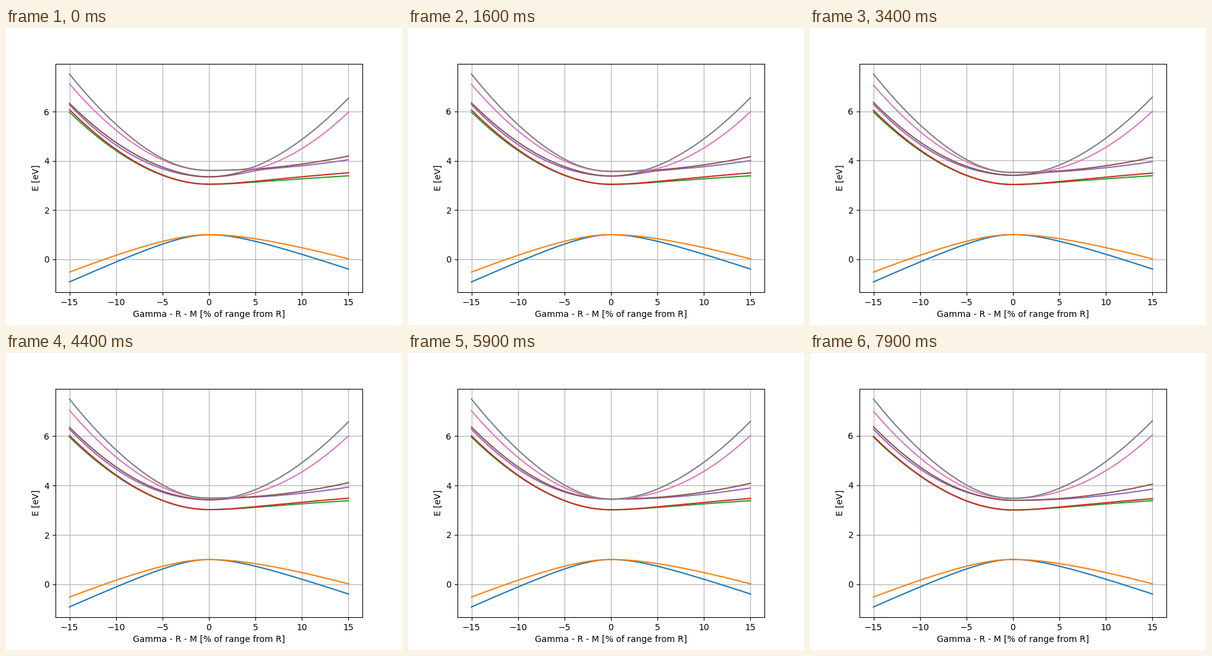
Write a matplotlib script that moves like this. It is 640 px wide and 480 px high and loops after 8 s.

```python
import numpy as np
import matplotlib.pyplot as plt
from matplotlib.animation import FuncAnimation

FRAMES = 80
SPAN = 15
ROUND = 0.3  # width of the rounded tip of each band, as a share of the span

x = np.linspace(-SPAN, SPAN, 301)
v = np.abs(x) / SPAN


def rise(p):
    """Smooth growth from 0 at the centre to 1 at the edge, like |x|**p far out."""
    def f(r):
        return (ROUND**2 + r**2) ** (p / 2)
    return (f(v) - f(0)) / (f(1) - f(0))


def band(tip, left, right, p_left, p_right):
    return tip + np.where(x < 0, left * rise(p_left), right * rise(p_right))


def repel(a, b, strength):
    """Avoided crossing of two bands."""
    gap = np.where(x < 0, strength * rise(.75), .11 * np.tanh((3 * v)**2))
    mean, half = (a + b) / 2, np.hypot(a - b, gap) / 2
    return mean - half, mean + half


def bands(t):
    blue = band(1.003, -1.919, -1.396, 1, 1.05)
    orange = band(1.003, -1.52, -.985, 1.2, 1.3)
    green = band(3.053 - .05 * t, 2.927 + .02 * t, .342 + .036 * t, 1.82, .5)
    red = band(3.055 - .05 * t, 3.025 - .05 * t, .465 - .009 * t, 1.82, .5)

    # The steep pair climbs while the flat pair sinks through it
    steep, flat = 3.355 + .12 * t, 3.615 - .22 * t
    pair1 = repel(band(steep, 3.125 - .02 * t, 2.625 - .06 * t, 2, 2.07),
                  band(flat, 3.315 - .03 * t, .435 + .02 * t, 1.85, 2), .72)
    pair2 = repel(band(steep, 3.365 + .015 * t, 3.195 - .06 * t, 1.7, 1.77),
                  band(flat, 3.535 + .075 * t, .585 + .07 * t, 1.85, 2), 1.11)
    return [blue, orange, green, red, *np.sort([*pair1, *pair2], axis=0)]


fig, ax = plt.subplots(figsize=(6.4, 4.8), dpi=100)
lines = [ax.plot(x, e)[0] for e in bands(0)]
ax.set_xlabel("Gamma - R - M [% of range from R]")
ax.set_ylabel("E [eV]")
ax.grid()


def update(i):
    energies = bands(i / (FRAMES - 1))
    for line, e in zip(lines, energies):
        line.set_ydata(e)
    low, high = np.min(energies), np.max(energies)
    pad = .05 * (high - low)
    ax.set_ylim(low - pad, high + pad)
    return lines


anim = FuncAnimation(fig, update, frames=FRAMES, interval=100,
                     repeat=True, repeat_delay=0, blit=False)
plt.show()
```
